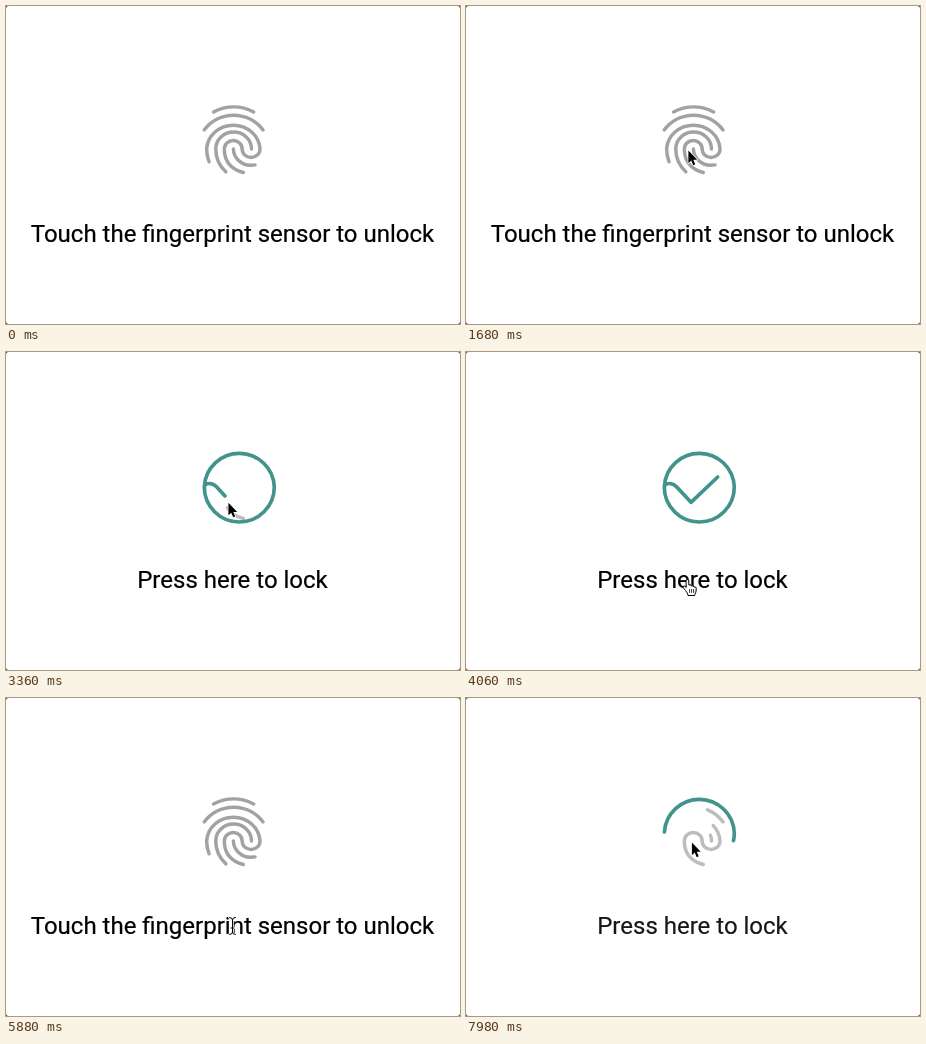
Write an HTML page that moves like this. It is 454 by 318 pixels and loops after 8 s.

```html
<!DOCTYPE html>
<html lang="en">
<head>
<meta charset="utf-8">
<title>Fingerprint unlock</title>
<style>
  html, body { margin: 0; width: 100%; height: 100%; overflow: hidden; background: #555; }
  svg { display: block; width: 454px; height: 318px; background: #fff; border-radius: 3px; }
  path, circle { fill: none; stroke-linecap: round; stroke-linejoin: round; }
  text { font: 24px Roboto, Arial, sans-serif; text-anchor: middle; stroke: #000; stroke-width: .2; }
  #ridges { stroke: #a2a2a2; }
  #mark { stroke: #42938c; stroke-width: 3.7; }
  #ring { stroke: #000; stroke-width: 1.3; }
  #arrow { fill: #000; stroke: #fff; stroke-width: 1.3; paint-order: stroke; }
  #hand { stroke: #000; }
  #palm { fill: #fff; }
  #beam { stroke: #000; }
  #beam :first-child { stroke: #fff; stroke-width: 2.6; }
</style>
</head>
<body>
<svg viewBox="0 0 454 318">
  <g id="ridges" transform="translate(186.1 92.1) scale(3.46)">
    <path d="M6.2 4A12.2 12.2 0 0 1 17.8 4"/>
    <path data-wait="250" d="M3.5 9.2A10.6 10.6 0 0 1 20.5 9.2"/>
    <path d="M9.75 21.3Q6.84 18.6 6.84 14.7A5.16 4.9 0 0 1 17.16 14.7"/>
    <path d="M11.94 14.7A5 4.8 0 0 0 16.9 19.4L18.2 19.3"/>
    <path d="M4.9 18.4Q4.2 16.5 4.2 14.7A7.73 7.33 0 0 1 19.63 14.7A2.58 2.44 0 0 1 14.47 14.7A2.58 2.44 0 0 0 9.31 14.7Q9.31 20 14.8 21.5"/>
  </g>
  <path id="mark" d="M198.4 134A35 35 0 0 1 268.3 135A35 35 0 0 1 198.3 135C198.3 130.5 206.5 130.3 210.5 134.8L225 150.3 251.7 125"/>
  <text id="touch" x="226.5" y="236">Touch the fingerprint sensor to unlock</text>
  <text id="press" x="226.5" y="236">Press here to lock</text>
  <circle id="ring"/>
  <g id="cursor">
    <path id="arrow" d="M.4.6V13.2L3.2 10.6 5.2 15.2 7.2 14.3 5.3 9.8H9.2Z"/>
    <g id="hand">
      <path id="palm" d="M-2 1.8Q-2 .5-.6.5T.8 1.8V6Q3.4 5 3.4 7 6 6 6 8 8.2 7.6 8.2 9V11Q8.2 13 6.8 15.5V16.5H0Q0 14-4.6 9C-5.8 7.2-3.9 6-2 8.2Z"/>
      <path d="M1.6 10.5v3m2-3v3m2-3v3" stroke-width=".8"/>
    </g>
    <g id="beam">
      <path d="M-3-7.5Q0-7.5 0-5 0-7.5 3-7.5M0-5V7M-3 9.5Q0 9.5 0 7 0 9.5 3 9.5M-1.5 3h3"/>
      <path d="M-3-7.5Q0-7.5 0-5 0-7.5 3-7.5M0-5V7M-3 9.5Q0 9.5 0 7 0 9.5 3 9.5M-1.5 3h3"/>
    </g>
  </g>
</svg>
<script>
const LOOP = 8000, STEP = 70;
const UNLOCK = 2450, LOCK = 4690, UNLOCK_AGAIN = 7490, TAP = 1610;
const PRESS = 140, WAIT = 120, DRAW = 940, REWIND = 490;
const FADE_OUT = 225, FADE_IN = 290;
const ERASE_SPEED = 0.058; // icon units per ms

const el = id => document.getElementById(id);
const ridges = [...el('ridges').children];
const clamp = v => Math.min(1, Math.max(0, v));
const show = (node, on) => node.style.display = on ? '' : 'none';

// progress: how many ms of the unlocking have been played
function phase(t) {
  if (t < UNLOCK) return { open: false, since: LOOP, progress: 0 };
  if (t >= LOCK && t < UNLOCK_AGAIN) {
    const since = t - LOCK;
    return { open: false, since, progress: (WAIT + DRAW) * (1 - clamp(since / REWIND)) };
  }
  const since = t - (t < LOCK ? UNLOCK : UNLOCK_AGAIN);
  return { open: true, since, progress: since };
}

function pointer(t) {
  let x = 262, y = 322;
  const glide = (start, span, toX, toY) => {
    const k = clamp((t - start) / span), e = k * k * (3 - 2 * k);
    x += (toX - x) * e;
    y += (toY - y) * e;
  };
  glide(0, 560, 216, 140);
  glide(630, 280, 219, 133);
  glide(1190, 280, 222, 144);
  glide(3220, 840, 222, 227);
  glide(4060, 280, 226.5, 227);
  glide(5880, 350, 225.5, 144);
  return { x, y };
}

function drawIcon(progress) {
  for (const ridge of ridges) {
    const length = ridge.getTotalLength();
    const gone = Math.max(0, progress - (ridge.dataset.wait || WAIT)) * ERASE_SPEED;
    ridge.style.strokeDasharray = `${length + 1} 999`;
    ridge.style.strokeDashoffset = -gone;
    show(ridge, gone < length);
  }
  el('ridges').style.opacity = 1 - 0.3 * clamp(progress / 500);

  const drawn = clamp((progress - WAIT) / DRAW);
  el('mark').style.strokeDasharray = `${drawn * el('mark').getTotalLength()} 999`;
  show(el('mark'), drawn > 0);
}

function drawLabels(open, since) {
  const leaving = 1 - clamp(since / FADE_OUT), arriving = clamp((since - FADE_OUT) / FADE_IN);
  el('touch').style.opacity = open ? leaving : arriving;
  el('press').style.opacity = open ? arriving : leaving;
}

function drawPointer(t, { open, since, progress }) {
  const { x, y } = pointer(t);
  const held = [UNLOCK, LOCK, UNLOCK_AGAIN].some(end => t >= end - PRESS && t < end);
  const tapped = t >= TAP && t < TAP + STEP;
  show(el('ring'), held || tapped);
  el('ring').setAttribute('transform', `translate(${x} ${y})`);
  el('ring').setAttribute('r', held ? 31 : 22);

  const onText = y > 217 && y < 238;
  const onRidge = x > 224 && y < 152 && progress <= WAIT;
  const pressShown = open === since >= FADE_OUT;
  const kind = onText ? (pressShown ? 'hand' : 'beam') : onRidge ? 'hand' : 'arrow';
  for (const id of ['arrow', 'hand', 'beam']) show(el(id), id === kind);
  el('cursor').setAttribute('transform', `translate(${x} ${y})`);
}

function render(t) {
  const now = phase(t);
  drawIcon(now.progress);
  drawLabels(now.open, now.since);
  drawPointer(t, now);
}

const start = performance.now();
function tick() {
  const t = (performance.now() - start) % LOOP;
  render(Math.floor(t / STEP) * STEP);
  requestAnimationFrame(tick);
}
tick();
</script>
</body>
</html>
```
